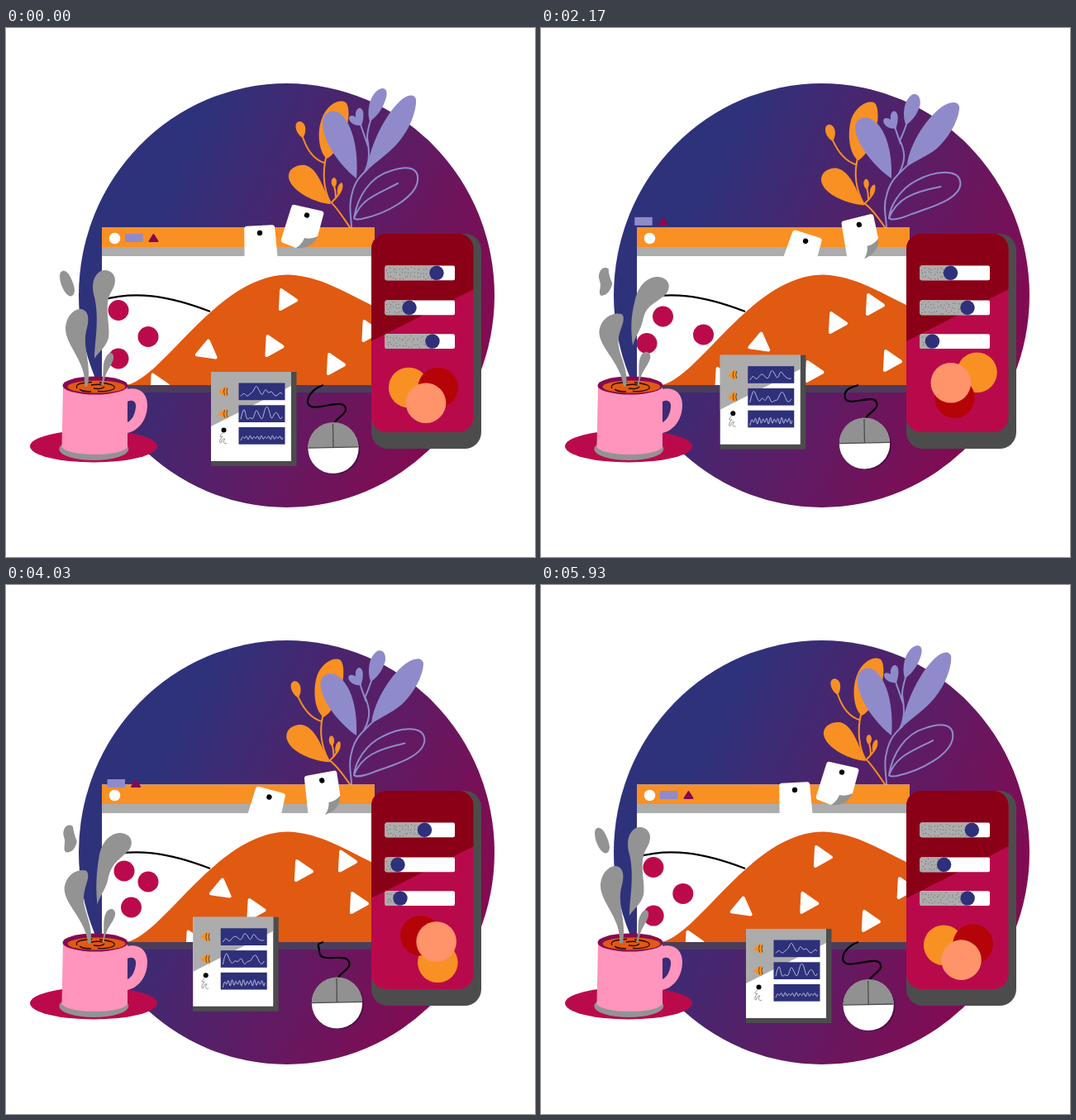
Write an HTML page that moves like this. It is 640 px wide and 640 px high and loops after 5960 ms.

```html
<!DOCTYPE html>
<html lang="en">
<head>
<meta charset="utf-8">
<title>Desk scene</title>
<style>
  html, body { margin: 0; width: 100%; height: 100%; overflow: hidden; background: #fff; }
  svg { display: block; width: 100vw; height: 100vh; }
</style>
</head>
<body>
<svg id="stage" viewBox="0 0 640 640">
  <defs>
    <linearGradient id="sky" gradientUnits="userSpaceOnUse" x1="190" y1="215" x2="565" y2="390">
      <stop offset="0" stop-color="#2e327b"/><stop offset="1" stop-color="#820b52"/>
    </linearGradient>
    <clipPath id="hillClip"><path d="M145 432C190 425 255 298 342 298.500C380 300 410 320 446 337V432Z"/></clipPath>
    <clipPath id="pageClip"><rect x="116" y="276" width="330" height="156"/></clipPath>
    <clipPath id="phoneClip"><rect x="442" y="249" width="123.500" height="240" rx="18"/></clipPath>
  </defs>
  <ellipse cx="339.500" cy="323.500" rx="251.500" ry="256.500" fill="url(#sky)"/>
  <g id="plant"></g>

  <g id="window">
    <rect x="116" y="432" width="330" height="9" fill="#4b3c5b"/>
    <rect x="116" y="241.500" width="330" height="190.500" fill="#fff"/>
    <rect x="116" y="241.500" width="330" height="24" fill="#f99024"/>
    <rect x="116" y="265" width="330" height="11" fill="#acacac"/>
    <path d="M116 329C155 318 195 323 247 343" fill="none" stroke="#000" stroke-width="2.200"/>
    <g id="dots" clip-path="url(#pageClip)" fill="#bb0a4c"></g>
    <path d="M145 432C190 425 255 298 342 298.500C380 300 410 320 446 337V432Z" fill="#e05a12"/>
    <g id="tris" clip-path="url(#hillClip)" fill="#fff" stroke="#fff" stroke-width="4" stroke-linejoin="round"></g>
  </g>

  <g id="icons">
    <rect x="144" y="249" width="21.500" height="10" fill="#8f8bca"/>
    <path d="M178.500 250L183.500 258H173.500Z" fill="#840a50" stroke="#840a50" stroke-width="2" stroke-linejoin="round"/>
  </g>
  <circle cx="131.500" cy="254.500" r="6.800" fill="#fff"/>

  <g id="noteA">
    <path d="M-15 -9H15Q18.500 -9 18.500 -5.500L20 30H-20L-18.500 -5.500Q-18.500 -9 -15 -9Z" fill="#fff"/>
    <circle r="3.200"/>
  </g>
  <g id="noteB">
    <path d="M-17 -9H16Q19.500 -9 19.500 -6L18.400 22Q10 37 -4 41.500L-21 39Q-24 38.500 -23.700 35L-20.500 -6Q-20.300 -9 -17 -9Z" fill="#fff"/>
    <path d="M-4 41.500Q2 36 3.300 27.500Q11 28 18.400 22Q15 39 -4 41.500Z" fill="#939393"/>
    <circle r="3.200"/>
  </g>

  <rect x="442" y="249" width="133" height="260" rx="20" fill="#4c4c4c"/>
  <g clip-path="url(#phoneClip)">
    <path d="M442 249H566V489H442Z" fill="#b80a4b"/>
    <path d="M442 249H566V316L442 379Z" fill="#8a0016"/>
    <g id="sliders"></g>
    <g id="discs"></g>
  </g>

  <g id="pad">
    <path d="M248 416H351.500V530H248Z" fill="#4c4c4c"/>
    <path d="M248 416H345V524H248Z" fill="#fff"/>
    <path d="M248 416H345V433L248 482Z" fill="#acacac"/>
    <g id="bars"></g>
    <circle cx="263.500" cy="486.500" r="3"/>
    <path d="M262 490C257 494 259 495 262 494C258 499 258 502 260 502C262 500 260 497 265 497C261 501 265 504 267 502" fill="none" stroke="#8f8f8f"/>
  </g>

  <path id="cable" fill="none" stroke="#000" stroke-width="2.200"/>
  <g id="mouse">
    <circle cx="1.800" cy="1" r="30.600" fill="#4c0d46"/>
    <circle r="30.600" fill="#fff"/>
    <path d="M-30.600 -1A30.600 30.600 0 0 1 30.600 -1Z" fill="#919191"/>
    <path d="M-30.600 -1H30.600M0 -30V-1" fill="none" stroke="#4c4c4c" stroke-width="1.300"/>
  </g>

  <ellipse cx="106" cy="506" rx="77" ry="19.500" fill="#bb0a4c"/>
  <ellipse cx="106.300" cy="509.500" rx="42" ry="13.500" fill="#939393"/>
  <path fill="#ff94bd" fill-rule="evenodd" d="M146 437C160 434 171 441 171 456C171 474 160 488 146 490ZM147 452C153 449 158 452 157 459C156 468 152 475 147 477Z"/>
  <path fill="#ff94bd" d="M69 432H147V507C140 519 75 519 67.500 507Z"/>
  <ellipse cx="108" cy="432.500" rx="39.500" ry="11" fill="#850a50"/>
  <ellipse cx="109.500" cy="434" rx="35" ry="7.600" fill="#e05a12"/>
  <path d="M86 436C82 430 95 429 104 428.500M113 429C124 430 133 432 131 436C129 439 117 440 111 439.500M103 440C95 440 90 438 89 437M106 436C112 437 117 436 119 434M103 432C108 431 115 431 117 432" fill="none" stroke="#220800" stroke-width="1.300"/>
  <g id="steam" fill="#939393"></g>
</svg>

<script>
const LOOP = 5960, HALF = 2980;
const TIMES = [0, 1230, 2170, 2930, 4030, 5170, LOOP];
const $ = id => document.getElementById(id);

function add(parent, tag, attrs) {
  const el = document.createElementNS('http://www.w3.org/2000/svg', tag);
  for (const k in attrs) el.setAttribute(k, attrs[k]);
  parent.appendChild(el);
  return el;
}
const lerp = (a, b, p) => a + (b - a) * p;
const wave = (t, peak) => t < peak ? t / peak : (LOOP - t) / (LOOP - peak);
const ease = p => p * p * (3 - 2 * p);
const place = (el, x, y, turn = 0) =>
  el.setAttribute('transform', `translate(${x} ${y}) rotate(${turn})`);

// Smooth closed track through six values at TIMES
function track(v, t) {
  const n = 6;
  let i = 0;
  while (i < n - 1 && t >= TIMES[i + 1]) i++;
  const at = k => v[(k + n) % n];
  const when = k => TIMES[(k + n) % n] + Math.floor(k / n) * LOOP;
  const slope = k => (at(k + 1) - at(k - 1)) / (when(k + 1) - when(k - 1));
  const d = when(i + 1) - when(i), s = (t - when(i)) / d, e = ease(s);
  return at(i) * (1 - e) + at(i + 1) * e
    + d * s * (1 - s) * ((1 - s) * slope(i) - s * slope(i + 1));
}

// Path pairs of equal structure, blended number by number
const morphs = [];
function morph(parent, a, b, attrs, pace) {
  const nums = b.match(/-?[\d.]+/g).map(Number);
  morphs.push({ el: add(parent, 'path', attrs), a, nums, pace });
}
function drawMorph(m, p) {
  let i = 0;
  m.el.setAttribute('d', m.a.replace(/-?[\d.]+/g, n => lerp(+n, m.nums[i++], p).toFixed(2)));
}

const ORANGE = '#f99024', LILAC = '#8f8bca', NAVY = '#2e307a';
const fill = c => ({ fill: c });
const line = (c, w = 2) => ({ fill: 'none', stroke: c, 'stroke-width': w, 'stroke-linecap': 'round' });
const leaf = (a, b, attrs) => morph($('plant'), a, b, attrs, 'linear');

// Orange branch
leaf('M416 241C405 225 398 214 392 210C384 195 383 175 387 157', 'M416 241C405 225 397 216 389 212C380 195 377 178 381 160', line(ORANGE));
leaf('M359 132C365 150 375 160 385 163', 'M350 136C358 152 369 163 380 166', line(ORANGE));
leaf('M394 211C397 207 402 204 403 199M399 205Q399 198 397 191', 'M390 214C393 210 398 207 399 202M395 208Q395 201 393 193', line(ORANGE));
leaf('M388 158C378 150 376 125 382 110C388 92 404 85 411 90C418 97 414 125 404 140C398 150 393 156 388 158Z',
     'M382 161C371 152 368 130 373 110C379 94 394 87 401 91C408 98 405 125 398 140C393 152 387 158 382 161Z', fill(ORANGE));
leaf('M359 133C353 130 349 121 351 116C353 112 358 112 361 117C364 123 361 131 359 133Z',
     'M350 138C344 135 340 126 342 121C344 117 349 117 352 122C355 128 353 136 350 138Z', fill(ORANGE));
leaf('M393 213C375 212 345 198 342 181C341 169 354 165 362 166C378 170 384 195 393 213Z',
     'M390 215C372 214 341 204 338 187C337 175 348 170 357 171C374 175 381 198 390 215Z', fill(ORANGE));
leaf('M397 193C392 190 393 181 397 181C401 182 401 190 397 193Z', 'M393 196C388 193 388 184 392 183C396 184 397 192 393 196Z', fill(ORANGE));
leaf('M402 203C399 196 402 188 406 187C409 189 407 199 402 203Z', 'M398 206C395 199 398 191 402 190C405 192 403 202 398 206Z', fill(ORANGE));

// Lilac branch
leaf('M437 171C430 178 422 184 418 203C414 217 418 230 418 242', 'M445 165C434 176 422 184 418 203C413 217 418 230 418 242', line(LILAC));
leaf('M441 112Q437 125 437 133C440 150 440 162 434 174M429 117L438 143', 'M443 117Q438 131 433 137C441 150 442 159 433 176M428 122L434 139', line(LILAC));
leaf('M424 182C410 172 382 140 383 114C384 102 394 98 402 102C418 112 427 145 424 182Z',
     'M424 182C405 170 378 140 379 121C381 108 395 109 402 115C416 125 425 150 424 182Z', fill(LILAC));
leaf('M437 172C438 150 455 110 475 90C485 80 494 79 496 86C497 98 490 120 475 138C463 152 450 160 437 172Z',
     'M445 166C446 146 465 113 488 98C498 92 508 91 510 99C509 115 497 135 480 149C468 157 455 160 445 166Z', fill(LILAC));
leaf('M440 113C436 100 440 80 452 74C459 71 462 76 460 84C456 98 448 108 440 113Z',
     'M442 119C437 108 438 90 448 83C455 81 459 88 458 97C455 108 448 115 442 119Z', fill(LILAC));
leaf('M430 118C421 119 414 113 415 108C417 105 421 106 423 108C422 100 426 96 429 97C434 99 433 110 430 118Z',
     'M429 123C420 124 413 118 414 112C416 109 420 110 423 112C422 105 425 101 428 102C433 104 432 115 429 123Z', fill(LILAC));
leaf('M421 230C425 205 440 180 465 173C485 166 500 168 498 185C495 205 460 225 430 231C424 232 421 231 421 230C430 207 445 203 474 188',
     'M421 230C421 220 432 200 450 189C470 176 510 168 511 190C510 208 480 212 455 223C440 230 425 234 421 230C430 207 450 197 487 193.500', line(LILAC));

// Steam
const puff = (a, b) => morph($('steam'), a, b, {}, 'eased');
puff('M65 300C65 293 71 291 76 298C80 304 83 313 83 318C82 326 77 327 71 319C67 313 65 306 65 300Z',
     'M71 302C71 290 79 287 83 290C82 296 84 301 87 307C85 316 80 323 73 325C69 322 75 315 73 310C72 307 71 305 71 302Z');
puff('M95 434C98 405 73 385 72 365C72 348 83 340 90 340C100 341 101 352 98 363C91 385 104 405 99 433Z',
     'M101 434C96 404 70 388 70 368C73 348 92 344 100 348C104 356 94 366 93 378C91 395 107 410 104 433Z');
puff('M107 400C107 380 114 350 106 322C102 302 112 292 121 293C133 295 135 307 128 318C117 335 127 360 124 375C121 386 112 392 107 400Z',
     'M112 381C109 365 107 350 115 333C121 312 134 302 148 303C162 305 163 318 154 325C141 334 127 330 123 349C121 360 114 370 112 381Z');
puff('M115 432C120 418 115 408 121 398C125 391 131 392 130 400C128 410 120 414 118 432Z',
     'M117 432C121 418 116 408 121 396C125 389 133 390 133 398C131 409 121 414 119 432Z');

// Page contents
const dotTracks = [
  [[136, 142, 147.5, 148, 143, 137.5], [341.5, 345, 349, 349, 346, 342.5]],
  [[172, 187, 196.5, 183, 172, 172], [373.5, 372, 371, 364, 359, 369.5]],
  [[136, 131, 128, 137, 151.5, 142.5], [400, 388, 381.5, 384, 390, 397]]
].map(([x, y]) => ({ x, y, el: add($('dots'), 'circle', { r: 12.5 }) }));

const triTracks = [
  [[341.5, 351.5, 359.5, 360.5, 360.5, 347], [329, 345, 357, 350, 346, 334], 3],
  [[325, 329, 331, 318, 303, 317], [385, 402, 416, 406, 393, 388], 3],
  [[243.5, 258.5, 265, 264, 260.5, 249.5], [388, 383, 379, 373, 366, 380], -82],
  [[399.5, 418, 425.5, 427, 427.5, 408.5], [407, 409, 403, 392, 385, 400], 3],
  [[442, 415.5, 404.5, 410, 413.5, 433.5], [367, 347, 335, 333.5, 334.5, 357.5], 3],
  [[186, 208, 222, 232, 229, 200], [431.5, 422.5, 424, 427, 431.5, 431], 3]
].map(([x, y, turn]) => ({ x, y, turn, el: add($('tris'), 'path', { d: 'M-9 -11.500L9.500 0L-9 11.500Z' }) }));

// Phone
let seed = 7;
const rand = () => (seed = (seed * 16807) % 2147483647) / 2147483647;
const sliders = [
  [287.5, [521, 490, 495.5, 504.5, 506.5, 517]],
  [329.5, [488, 512, 516, 506.5, 474, 482]],
  [370.2, [516, 494, 473.5, 472, 477, 506]]
].map(([y, x], i) => {
  const g = $('sliders');
  add(g, 'rect', { x: 458.5, y, width: 84.5, height: 17.7, rx: 2, fill: '#fff' });
  const level = add(g, 'rect', { x: 458.5, y, height: 17.7, rx: 2, fill: '#acacac' });
  const clip = add(add(g, 'clipPath', { id: 'level' + i }), 'rect', { x: 458.5, y, height: 17.7 });
  let d = '';
  for (let k = 0; k < 66; k++) {
    const px = 460 + (k % 22) * 3.6 + rand() * 2.5;
    const py = y + 2 + Math.floor(k / 22) * 5.2 + rand() * 4;
    d += `M${px.toFixed(1)} ${py.toFixed(1)}h.6`;
  }
  add(g, 'path', { d, stroke: '#333', 'stroke-width': 1, 'clip-path': `url(#level${i})` });
  return { x, level, clip, knob: add(g, 'circle', { cy: y + 8.8, r: 8.7, fill: NAVY }) };
});

const discs = [
  [511.5, 435, 24.3, 180, ORANGE],
  [508.7, 436.2, 14, -5, '#b50407'],
  [507.5, 438.7, 15, 88, '#ff9369']
].map(([x, y, r, from, c]) => ({ x, y, r, from, el: add($('discs'), 'circle', { r: 24.3, fill: c }) }));

// Notepad rows
function squiggle(p) {
  let d = `M${p[0]} ${p[1]}`;
  for (let i = 2; i < p.length - 2; i += 2)
    d += `Q${p[i]} ${p[i + 1]} ${(p[i] + p[i + 2]) / 2} ${(p[i + 1] + p[i + 3]) / 2}`;
  return d;
}
const rowY = [429.5, 456.3, 483];
const waveX = i => 284 + i * 52 / 14;
const heights = [
  [[16, 11, 17, 13, 11, 2, 9, 16, 6, 13, 9, 16, 15, 10, 17], [17, 10, 17, 12, 8, 16, 17, 1, 9, 17, 4, 10, 14, 17, 13]],
  [[17, -1, 19, 14, 18, 4, 12, 19, 2, 2, 19, 9, 9, 19, 9], [17, 0, 6, 18, 9, 19, 6, 18, 17, 18, 1, 4, 18, 16, 9]]
];
const zigzag = amp => Array.from({ length: 24 }, (_, i) => 12.5 + (i % 2 ? -amp : amp) + Math.sin(i * 2.1) * amp * .3);
heights.push([zigzag(3.6), zigzag(6.5)]);
rowY.forEach((y, r) => {
  add($('bars'), 'rect', { x: 281.5, y, width: 56, height: 20.7, fill: NAVY });
  const pts = h => h.flatMap((v, i) => [r < 2 ? waveX(i) : 284 + i * 52 / 23, y + v]);
  const [a, b] = heights[r];
  morph($('bars'), squiggle(pts(a)), squiggle(pts(b)), { fill: 'none', stroke: '#b9b8da', 'stroke-width': 1 }, 'eased');
  if (r < 2) {
    add($('bars'), 'path', { d: `M256.500 ${y + 11}L266 ${y + 3.5}Q269 ${y + 10} 267 ${y + 17}Z`, fill: ORANGE });
    add($('bars'), 'path', { d: `M264.500 ${y + 6}q-2 4 0 9m3.500 -9q-2 4 0 9`, fill: 'none', stroke: '#5c3a12', 'stroke-width': .9 });
  }
});

const mouseX = [396, 386.5, 391.5, 396, 400.5, 398.5];
const mouseY = [508.5, 506.5, 503, 500.5, 506, 507.5];
const bendX = [365, 363, 367.5, 371.5, 379, 373];
const bendY = [452, 449, 445, 443, 443, 444];

function draw(t) {
  const pace = { linear: wave(t, HALF), eased: ease(wave(t, HALF)) };
  morphs.forEach(m => drawMorph(m, pace[m.pace]));

  const p = pace.eased;
  place($('noteA'), lerp(307, 323, p), lerp(248, 260, p), lerp(-3, 22, p));
  place($('noteB'), lerp(364, 389.5, p), lerp(226.5, 240.5, p), lerp(13, -20, p));

  const drift = ease(wave(t, 2680));
  place($('pad'), -34.5 * drift, -22.5 * drift);
  place($('icons'), -34 * drift, -22.2 * drift);

  dotTracks.forEach(d => place(d.el, track(d.x, t), track(d.y, t)));
  triTracks.forEach(d => place(d.el, track(d.x, t), track(d.y, t), d.turn));

  sliders.forEach(s => {
    const x = track(s.x, t);
    s.level.setAttribute('width', x - 458.5);
    s.clip.setAttribute('width', x - 458.5);
    s.knob.setAttribute('cx', x);
  });
  discs.forEach(d => {
    const a = (d.from + 360 * t / LOOP) * Math.PI / 180;
    place(d.el, d.x + d.r * Math.cos(a), d.y + d.r * Math.sin(a));
  });

  const mx = track(mouseX, t), my = track(mouseY, t);
  const bx = track(bendX, t), by = track(bendY, t);
  const qx = mx + 15, qy = my - 47;
  place($('mouse'), mx, my, -1);
  $('cable').setAttribute('d', `M384 432C374 435 ${bx} ${by - 8} ${bx} ${by}`
    + `C${bx} ${by + 18} ${qx} ${qy - 18} ${qx} ${qy}C${qx} ${qy + 6} ${mx + 3} ${my - 36} ${mx + 1} ${my - 30}`);
}

const start = performance.now();
function tick() {
  draw((performance.now() - start) % LOOP);
  requestAnimationFrame(tick);
}
tick();
</script>
</body>
</html>
```
